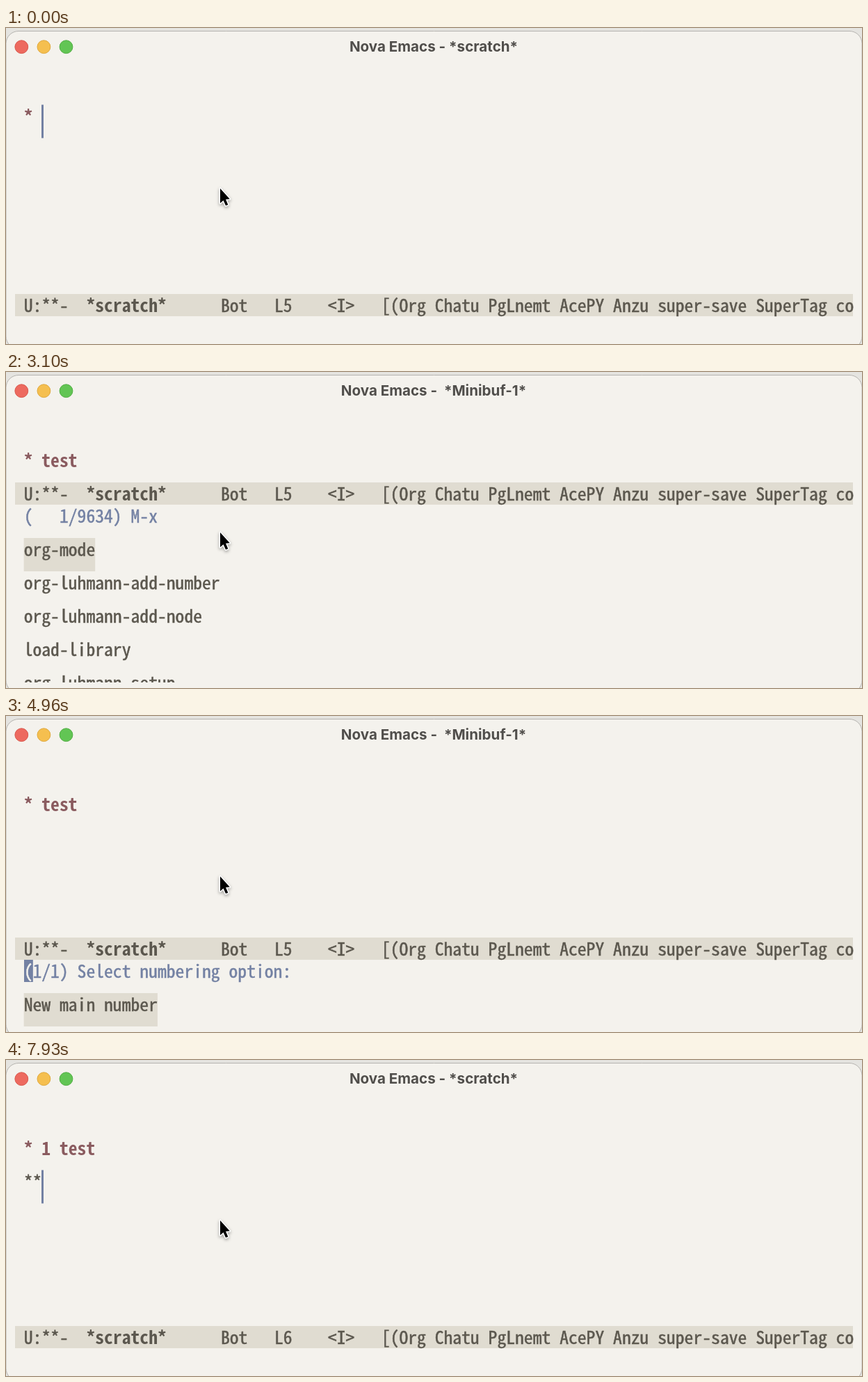
Recreate the animation shown at these times as an HTML page with a canvas. Size 1231x455 px, loop 8 s.

```html
<!DOCTYPE html>
<html lang="en">
<head>
<meta charset="utf-8">
<title>Emacs numbering demo</title>
<style>
  html, body { margin: 0; width: 100%; height: 100%; overflow: hidden; background: #e5e4e0; }
  canvas { display: block; width: 1231px; height: 455px; }
  #title {
    position: absolute; left: 0; top: 11.5px; width: 1230px;
    font: 700 20.6px/30px Inter, sans-serif; font-feature-settings: "calt" 0;
    color: #504e4b; text-align: center; white-space: pre;
  }
</style>
</head>
<body>
<canvas id="stage" width="1231" height="455"></canvas>
<div id="title"></div>
<script>
const ctx = document.getElementById('stage').getContext('2d');
const titleBar = document.getElementById('title');

const LOOP = 8000;
const CELL = 12.82, LEFT = 25.65, ROW = 48, MODE_ROW = 32, BASELINE = 26;
const HEADING_TOP = 110.5;
const PAPER = '#f4f2ed', BAND = '#e0dcd1', INK = '#5b574e';
const HEADING = '#8a5b5f', BLUE = '#7381a3';
const MONO = '"Noto Sans Mono CJK JP", "Noto Sans Mono CJK SC", "Noto Sans Mono", monospace';

// Font size whose advance equals one cell
ctx.font = `100px ${MONO}`;
const SIZE = 100 * CELL / ctx.measureText('0').width;

const colX = col => LEFT + col * CELL;

function rect(x, y, w, h, color) {
  ctx.fillStyle = color;
  ctx.fillRect(x, y, w, h);
}

function text(str, col, top, color = INK, weight = 400) {
  ctx.fillStyle = ctx.strokeStyle = color;
  ctx.lineWidth = 0.5;
  ctx.textAlign = 'center';
  [...str].forEach((ch, i) => {
    // CJK fonts may set the curly quote at full width
    const family = ch === '’' ? '"DejaVu Sans Mono", monospace' : MONO;
    const x = colX(col + i + 0.5), y = top + BASELINE;
    ctx.font = `${weight} ${SIZE}px ${family}`;
    ctx.fillText(ch, x, y);
    // A hairline outline gives the regular weight a medium look
    if (weight === 400) ctx.strokeText(ch, x, y);
  });
}

function windowFrame(title) {
  rect(0, 0, 1231, 455, '#e5e4e0');
  ctx.beginPath();
  ctx.roundRect(0, 4.5, 1231, 457.5, 18);
  ctx.fillStyle = PAPER;
  ctx.fill();
  ctx.strokeStyle = '#b5b3af';
  ctx.lineWidth = 1;
  ctx.stroke();

  [['#ed6a5f', '#d9574c'], ['#f5bf4f', '#dfa83c'], ['#62c554', '#51ae43']].forEach(([fill, edge], i) => {
    ctx.beginPath();
    ctx.arc(22.3 + i * 32.1, 27.2, 9.4, 0, 2 * Math.PI);
    ctx.fillStyle = fill;
    ctx.fill();
    ctx.strokeStyle = edge;
    ctx.stroke();
  });

  titleBar.textContent = title;
}

function modeLine(top, line) {
  rect(13, top, 1205, MODE_ROW, BAND);
  text('U:**-', 0, top);
  text('*scratch*', 7, top, INK, 700);
  text(`Bot   L${line}    <I>   [(Org Chatu PgLnemt AcePY Anzu super-save SuperTag co`, 22.1, top);
}

function pointer() {
  ctx.save();
  ctx.beginPath();
  [[308, 231], [308, 252.3], [312.6, 248.2], [316, 255.8], [319.3, 254.4], [316, 246.8], [321.8, 246.3]]
    .forEach(([x, y]) => ctx.lineTo(x, y));
  ctx.closePath();
  ctx.shadowColor = 'rgba(0,0,0,.35)';
  ctx.shadowBlur = 4;
  ctx.shadowOffsetY = 2;
  ctx.strokeStyle = '#fff';
  ctx.lineWidth = 3;
  ctx.lineJoin = 'round';
  ctx.stroke();
  ctx.shadowColor = 'transparent';
  ctx.fillStyle = '#000';
  ctx.fill();
  ctx.restore();
}

// The cursor column is null while the cursor is blinked off.
function editor(heading, line, body, cursorCol, cursorRow = 0) {
  return () => {
    windowFrame('Nova Emacs - *scratch*');
    text(heading, 0, HEADING_TOP, HEADING, 700);
    text(body, 0, HEADING_TOP + ROW);
    modeLine(383, line);
    if (cursorCol !== null) {
      rect(Math.round(colX(cursorCol)), HEADING_TOP + cursorRow * ROW, 3, ROW, BLUE);
    }
  };
}

function minibuffer(top, prompt, items, selected, cursorCol, message) {
  return () => {
    windowFrame('Nova Emacs -  *Minibuf-1*');
    text('* test', 0, HEADING_TOP, HEADING, 700);
    modeLine(top, 5);
    const promptTop = top + MODE_ROW;
    ctx.save();
    ctx.beginPath();
    ctx.rect(0, promptTop, 1231, (message ? 415 : 447) - promptTop);
    ctx.clip();
    text(prompt, 0, promptTop, BLUE);
    if (cursorCol !== null) {
      rect(Math.round(colX(cursorCol)), promptTop, CELL, cursorCol ? ROW : MODE_ROW, BLUE);
      if (cursorCol === 0) text(prompt[0], 0, promptTop, PAPER);
    }
    items.forEach((item, i) => {
      const itemTop = promptTop + (i + 1) * ROW;
      if (i === selected) rect(colX(0), itemTop, item.length * CELL, ROW, BAND);
      text(item, 0, itemTop);
    });
    ctx.restore();
    if (message) text(message, 0, 415);
  };
}

const commands = ['org-mode', 'org-luhmann-add-number', 'org-luhmann-add-node', 'load-library', 'org-luhmann-setup'];
const commandPrompt = (index, cursorCol, message) =>
  minibuffer(159, `(   ${index + 1}/9634) M-x `, commands, index, cursorCol, message);
const numberPrompt = cursorCol =>
  minibuffer(319, '(1/1) Select numbering option: ', ['New main number'], 0, cursorCol);
const typing = count => editor('* ' + 'test'.slice(0, count), 5, '', 2 + count);
const numbered = (body, visible) => editor('* 1 test', 6, body, visible ? body.length : null, 1);
const debug = 'Options debug - level=1 prev=’nil’ current=’nil’ parent=’nil’ command=’add-node’';

const steps = [
  [0, typing(0)],
  [370, typing(1)],
  [450, typing(2)],
  [530, typing(3)],
  [610, typing(4)],
  [1170, editor('* test', 5, '', null)],
  [1600, commandPrompt(0, 16)],
  [2100, commandPrompt(0, null)],
  [2600, commandPrompt(0, 16)],
  [3100, commandPrompt(0, null)],
  [3160, commandPrompt(1, 16)],
  [3660, commandPrompt(1, null)],
  [3970, commandPrompt(1, 0, debug)],
  [4030, numberPrompt(31)],
  [4530, numberPrompt(null)],
  [4960, numberPrompt(0)],
  [5020, numbered('', true)],
  [5450, numbered('', false)],
  [6010, numbered('', true)],
  [6440, numbered('', false)],
  [6690, numbered('*', true)],
  [7000, numbered('**', true)],
  [7500, numbered('**', false)],
  [7930, numbered('**', true)],
];

const start = performance.now();
function tick() {
  const time = (performance.now() - start) % LOOP;
  const [, draw] = steps.findLast(([at]) => at <= time);
  draw();
  pointer();
  requestAnimationFrame(tick);
}
tick();
</script>
</body>
</html>
```
